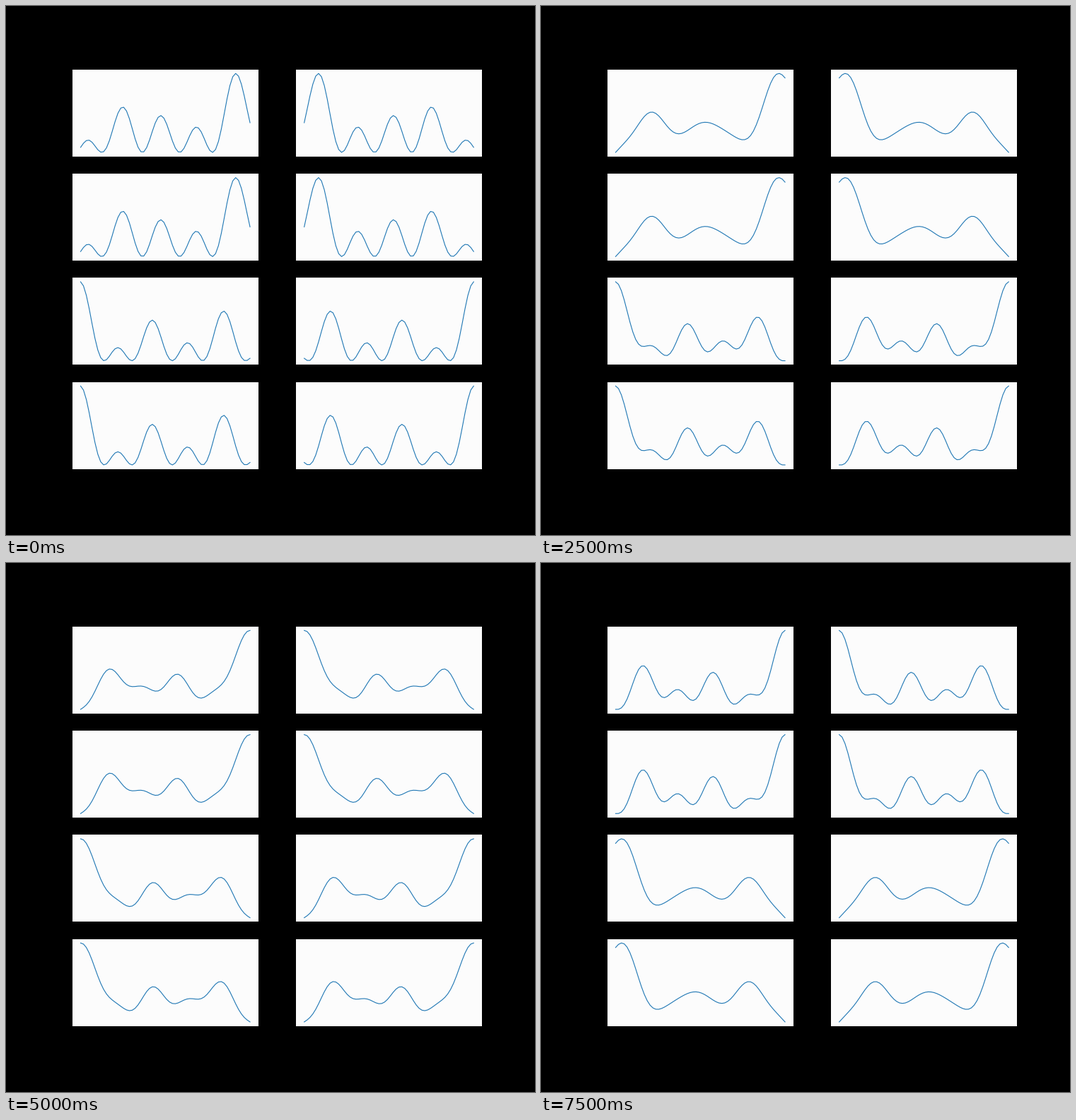
A matplotlib script that plays this animation: 748x748 px, repeating every 8000 ms.

```python
import numpy as np
import matplotlib.pyplot as plt
from matplotlib.animation import FuncAnimation

SIZE, DPI = 748, 100
FRAMES, INTERVAL = 16, 500
SPAN, MIDDLE = 10.0, 4.5    # seconds: whole sweep, and its turning shape
POINTS = 60

s = np.linspace(-1, 1, POINTS)


def ripple(centre, period):
    return np.cos(2 * np.pi * (s - centre) / period)


def unit(y):
    return (y - y.min()) / (y.max() - y.min())


# Squared waves riding on a slow drift: one odd, one even.
first = unit((0.02 + 0.18 * s + 0.05 * s**2 + 0.22 * s**3
              + 0.665 * ripple(-0.059, 0.870)) ** 2)
last = unit((0.11 + 0.22 * s**2 + 0.07 * s**3
             + 0.6 * ripple(0.152, 0.835)) ** 2)

# Halfway, the two overlap on a cubic tilt.
tilt = 0.176 - 0.15 * s + 0.06 * s**2 + 0.4 * s**3
middle = unit(0.2 * first + 0.485 * last + tilt
              + 0.035 * (1 + s) * ripple(0.758, 0.626))


def wave(t):
    """Curve at time t, rescaled to fill the panel."""
    if t < MIDDLE:
        k = np.sin(np.pi / 2 * (t / MIDDLE) ** 0.7) ** 2
        return unit(first + (middle - first) * k)
    k = ((t - MIDDLE) / (SPAN - MIDDLE)) ** 1.15
    return unit(middle + (last - middle) * k)


fig, axes = plt.subplots(4, 2, figsize=(SIZE / DPI, SIZE / DPI), dpi=DPI,
                         facecolor="black")
fig.subplots_adjust(left=0.125, right=0.9, bottom=0.125, top=0.88,
                    wspace=0.2, hspace=0.2)
lines = []
for ax in axes.flat:
    ax.set(facecolor="#fcfcfc", xlim=(-1.1, 1.1), ylim=(-0.05, 1.05),
           xticks=[], yticks=[])
    ax.spines[:].set_visible(False)
    lines += ax.plot(s, s, color="#1f77b4", lw=0.8)


def update(frame):
    t = frame * INTERVAL / 1000
    ahead, back = wave(t), wave(SPAN - t)
    # Two rows run forwards, two run mirrored and backwards.
    curves = [ahead, ahead[::-1]] * 2 + [back[::-1], back] * 2
    for line, y in zip(lines, curves):
        line.set_ydata(y)
    return lines


anim = FuncAnimation(fig, update, frames=FRAMES, interval=INTERVAL,
                     repeat=True, repeat_delay=0)
plt.show()
```
